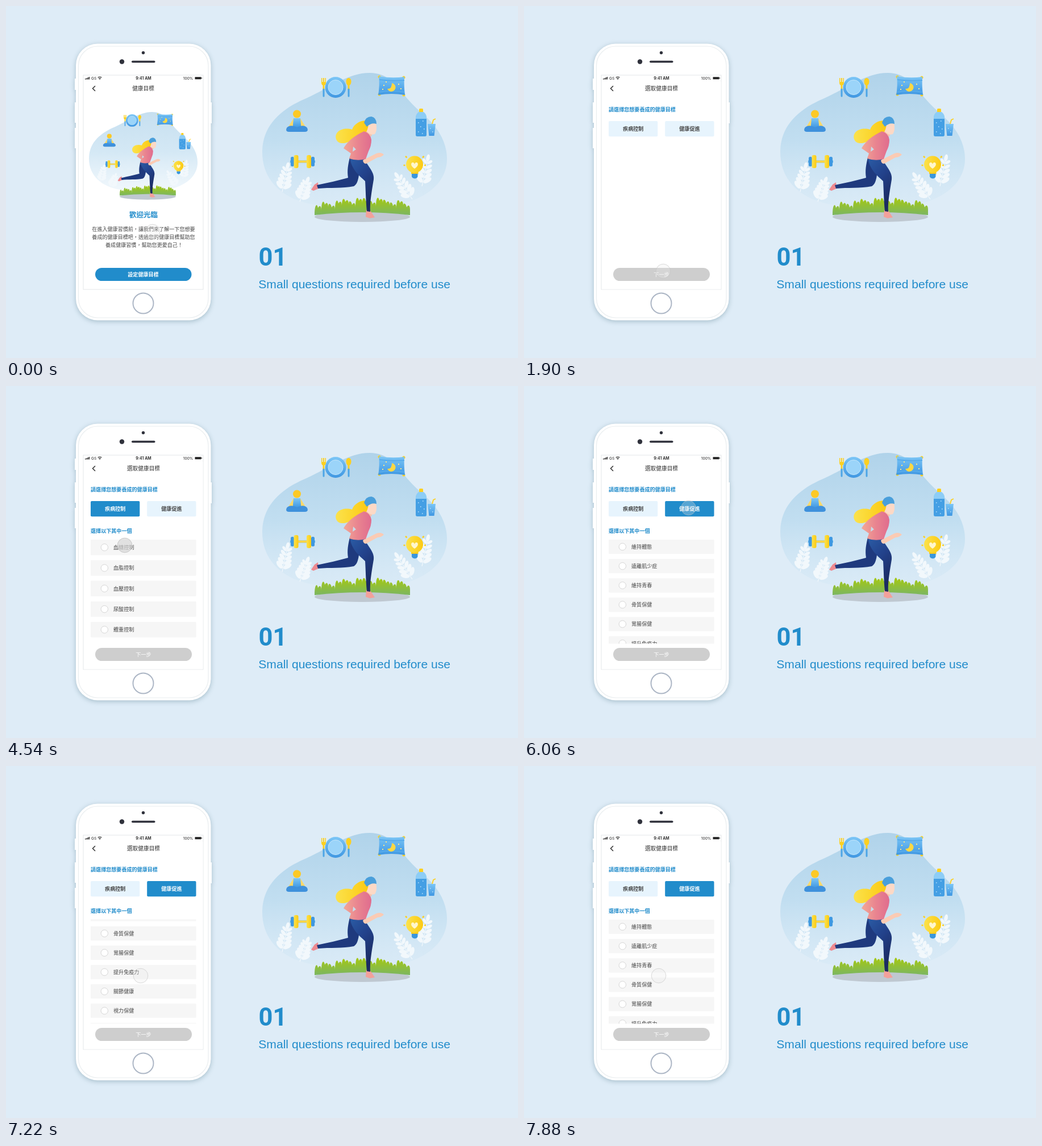
An HTML page that plays this animation: 901x621 px, repeating every 8000 ms.

```html
<!DOCTYPE html>
<html lang="zh-TW">
<head>
<meta charset="utf-8">
<title>Health goals</title>
<style>
html, body { margin: 0; width: 100%; height: 100%; overflow: hidden; background: #deecf7; }
svg { display: block; width: 901px; height: 621px; }
text { font: 400 9.07px "Noto Sans CJK TC", "Noto Sans CJK SC", "Noto Sans CJK JP", "Noto Sans CJK", sans-serif; fill: #444; }
.mid { text-anchor: middle; }
.strong { font-weight: 700; }
.title { font-size: 9.7px; font-weight: 500; fill: #333; }
.blue { fill: #218ccb; }
.white { fill: #fff; }
.status { font: 400 6.6px Inter, Roboto, sans-serif; fill: #222; }
.big { font: 700 43.5px Roboto, "Liberation Sans", sans-serif; fill: #218ccb; }
.caption { font: 400 21.1px "Liberation Sans", Arial, sans-serif; fill: #218ccb; }
.sky { opacity: var(--sky, 1); }
</style>
</head>
<body>
<svg viewBox="0 0 901 621">
<defs>
  <linearGradient id="sky" x2="0" y2="1"><stop stop-color="#b0d3ea"/><stop offset=".5" stop-color="#bfddf0" stop-opacity=".93"/><stop offset="1" stop-color="#d6e9f6" stop-opacity=".5"/></linearGradient>
  <linearGradient id="water" x2="0" y2="1"><stop stop-color="#7cc6f6"/><stop offset="1" stop-color="#3f97e2"/></linearGradient>
  <linearGradient id="gold"><stop stop-color="#fbe24c"/><stop offset="1" stop-color="#fcca12"/></linearGradient>
  <linearGradient id="pink"><stop stop-color="#f3a895"/><stop offset=".5" stop-color="#e98590"/><stop offset="1" stop-color="#e06c8e"/></linearGradient>
  <linearGradient id="navy" x2=".5" y2="1"><stop stop-color="#2b5ca6"/><stop offset=".5" stop-color="#22418a"/><stop offset="1" stop-color="#1b2a60"/></linearGradient>
  <linearGradient id="lawn" x2="0" y2="1"><stop stop-color="#a5c80f"/><stop offset="1" stop-color="#7bb663"/></linearGradient>
  <clipPath id="listClip"><path d="M148 270.5h188v184h-188z"/></clipPath>

  <g id="art">
    <path class="sky" fill="url(#sky)" d="M451 258C451 208 488 180 528 163C572 143 602 118 640 118C672 118 684 138 700 156C712 171 724 182 736 193C760 214 776 240 776 270C776 308 745 336 700 348C650 360 590 358 545 351C490 343 451 310 451 258Z"/>
    <g id="leaves" fill="#f2f8fc" stroke="#f2f8fc"></g>

    <g id="plate">
      <circle cx="580" cy="143.500" r="18.500" fill="url(#water)"/>
      <circle cx="580" cy="143.500" r="13" fill="#9bd4f9" stroke="#c4e6fc"/>
      <path d="M555 127v8q0 4 2.500 5v8h3v-8q2.500-1 2.500-5v-8h-1.500v7h-1.500v-7h-2v7h-1.500v-7zM598.500 133c0-8 9-8 9 0q0 5-3 7v8h-3v-8q-3-2-3-7z" fill="#fcd021"/>
      <path d="M559 147v12M603 147v12" stroke="#4ca5e6" stroke-width="3" stroke-linecap="round"/>
    </g>

    <g id="pillow">
      <g fill="#fcd021"><circle cx="657" cy="125" r="2.500"/><circle cx="700" cy="126" r="2.500"/><circle cx="657" cy="156" r="2.500"/><circle cx="700" cy="157" r="2.500"/></g>
      <path d="M656 124Q678 128 701 125Q700 140 702 157Q678 153 655 157Q658 140 656 124Z" fill="url(#water)"/>
      <path d="M657 130Q678 133 701 131M656 152Q678 148 701 152" stroke="#56abeb" stroke-width="2" fill="none"/>
      <path d="M679 136a7.500 7.500 0 1 1-8 10q8 1 8-10z" fill="#fcd843"/>
      <path d="M664 140h2M668 134h2M690 138h2M694 146h2M662 147h2" stroke="#fbe58b" stroke-width="2"/>
    </g>

    <g id="yoga">
      <circle cx="512" cy="190.500" r="7" fill="#fcc926"/>
      <path d="M506 198L497 213L505 216L512 205L519 216L527 213L518 198Z" fill="#fbd96a"/>
      <path d="M506 198h12l1.500 17h-15z" fill="url(#water)"/>
      <path d="M494 215Q500 208 512 214Q524 208 530 215Q533 222 526 222H498Q491 222 494 215Z" fill="#3f91dc"/>
    </g>

    <g id="dumbbell">
      <path d="M500 274.500h44" stroke="#58afe9" stroke-width="4"/>
      <path d="M512 274.500h20" stroke="#f9d548" stroke-width="4"/>
      <rect x="501" y="266" width="6" height="17" rx="2.500" fill="#4099e0"/><rect x="537" y="266" width="6" height="17" rx="2.500" fill="#4099e0"/>
      <rect x="506.500" y="263" width="8" height="23" rx="3" fill="url(#gold)"/><rect x="529" y="263" width="8" height="23" rx="3" fill="url(#gold)"/>
    </g>

    <g id="bottle">
      <rect x="727" y="181" width="7" height="7" rx="1.500" fill="#fcd021"/>
      <path d="M726 187h9q5 4 5 9v31q0 3-3 3h-13q-3 0-3-3v-31q0-5 5-9z" fill="#8dcdf6"/>
      <path d="M721 199h19v28q0 3-3 3h-13q-3 0-3-3z" fill="#449fe4"/>
      <path d="M750 208l2-7l4-2" fill="none" stroke="#fcd021" stroke-width="1.800"/>
      <path d="M742 208h14l-2.500 21h-9z" fill="url(#water)"/>
      <path d="M725 206h1.500M733 203h1.500M729 213h1.500M735 217h1.500M725 222h1.500M732 225h1.500M746 216h1.500M750 222h1.500" stroke="#bfe3fb" stroke-width="1.500"/>
    </g>

    <g id="bulb">
      <path d="M713 290h12.500v6h-12.500z" fill="#fcc91a"/>
      <circle cx="719" cy="279.500" r="15" fill="url(#gold)"/>
      <path d="M714 296h10.500v5q-1 3-5 3.500q-4.500-.5-5.500-3.500z" fill="#3b97dc"/>
      <path d="M719 287c-9-6-6-12-2.500-11q2 .5 2.500 3q.5-2.500 2.500-3c3.500-1 6.500 5-2.500 11z" fill="#fff6cc"/>
      <path d="M699.500 281h3M736 281h3M703 265l2.500 2.500M733 267.500l2.500-2.500" stroke="#fcd021" stroke-width="2.500"/>
    </g>

    <ellipse cx="627" cy="372" rx="84" ry="9" fill="#bfc8d1"/>
    <path id="grass" fill="url(#lawn)"/>

    <g id="runner">
      <path d="M549 311L550 322L541 326L537 324L543 315Z" fill="#ee8a90"/>
      <path d="M605 267L626 268C620 292 623 312 612 318C592 322 570 320 549 322L547 316C565 312 585 308 602 303C600 290 602 280 605 267Z" fill="#1f3a7e"/>
      <path d="M634 360L641 361L649 373L640 374.500L633 372Z" fill="#f3a09a"/>
      <path d="M605 267L629 268C638 284 649 294 647 306C643 330 640 348 641 363L635 362C633 340 633 325 632 309C623 300 608 290 605 267Z" fill="url(#navy)"/>
      <path d="M632 212L634 228L643 230L645 223Z" fill="#f7c3ac"/>
      <path d="M634 206Q643 200 651 206Q654 219 649 226Q641 229 635 221Z" fill="#fcd9c6"/>
      <path d="M637 203C628 200 613 206 609 218C592 213 577 222 581 235C585 246 603 243 611 234C624 236 630 226 634 222Q639 214 637 203Z" fill="url(#gold)"/>
      <path d="M630 206Q633 195 643 195Q652 197 652 208Q643 205 635 213Z" fill="#4a9fdb"/>
      <path d="M628 272L652 260Q660 257 665 262Q661 267 654 267L634 278Q629 279 628 272Z" fill="#fbcbb4"/>
      <path d="M630 221Q641 224 643 236Q643 247 638 256L633 270Q618 274 604 269L607 260L594 251Q604 233 630 221Z" fill="url(#pink)"/>
      <path d="M611 248l5 5l-6 4z" fill="#c6dcea"/>
    </g>
  </g>
</defs>

<g id="phone">
  <g style="filter:drop-shadow(0 2px 4px rgba(80,120,135,.4))" fill="#fff">
    <path d="M121 128h4v20h-4zM121 170h4v36h-4zM121 215h4v36h-4zM358 170h4v37h-4z"/>
    <rect x="123" y="66.500" width="237.500" height="488" rx="38"/>
  </g>
  <rect x="127.500" y="71" width="228.500" height="479" rx="34" fill="none" stroke="#e9edef" stroke-width="1.200"/>
  <g fill="#30323c"><circle cx="241.500" cy="82.500" r="2.700"/><circle cx="204" cy="98.300" r="4.200"/><rect x="221" y="96.500" width="41.500" height="3.600" rx="1.800"/></g>
  <circle cx="241.500" cy="524.500" r="18" fill="none" stroke="#acb6c5" stroke-width="2"/>
  <rect x="136" y="122" width="211" height="378" fill="#fff" stroke="#e4e7e9"/>
</g>

<g id="home">
  <text class="title mid" x="241.500" y="149">健康目標</text>
  <use href="#art" transform="matrix(.588 0 0 .588 -119.200 117.600)" style="--sky:.72"/>
  <text class="blue mid strong" x="242" y="372.700" style="font-size:12.500px">歡迎光臨</text>
  <text class="mid" x="242" y="397.300">在進入健康習慣前，讓我們來了解一下您想要</text>
  <text class="mid" x="242" y="410.900">養成的健康目標吧，透過您的健康目標幫助您</text>
  <text class="mid" x="243" y="424.500">養成健康習慣，幫助您更愛自己！</text>
  <rect x="157" y="462" width="169.500" height="23" rx="11.500" fill="#218ccb"/>
  <text class="white mid strong" x="241.500" y="477">設定健康目標</text>
</g>

<g id="picker">
  <path d="M137 134h209.500v365.500h-209.500z" fill="#fff"/>
  <text class="title mid" x="242" y="149">選取健康目標</text>
  <text class="blue strong" x="149" y="186">請選擇您想要養成的健康目標</text>
  <g id="tabs"></g>
  <g id="choices">
    <text class="blue strong" x="149" y="258.500">選擇以下其中一個</text>
    <g id="control"></g>
    <g clip-path="url(#listClip)"><g id="wellness"></g></g>
  </g>
  <rect id="next" x="157" y="462" width="170" height="23" rx="11.500"/>
  <text class="white mid" x="242" y="477" style="font-size:9.200px">下一步</text>
</g>

<path d="M157 141l-4.500 4.500l4.500 4.500" fill="none" stroke="#333" stroke-width="1.500"/>
<g id="statusBar">
  <path d="M139 128h1.500v1.500h-1.500zM141.200 127.200h1.500v2.300h-1.500zM143.400 126.200h1.500v3.300h-1.500zM145.600 125h1.500v4.500h-1.500zM332.500 125.200h11v4h-11zM344 126.400h1v1.600h-1z" fill="#222"/>
  <path d="M161.700 126.300q3.300-2.700 6.600 0M163.200 128q1.800-1.400 3.600 0" fill="none" stroke="#222" stroke-width="1.100"/>
  <circle cx="165" cy="129.200" r=".8" fill="#222"/>
  <text class="status" x="150" y="129.600">GS</text>
  <text class="status mid" x="242" y="129.600" style="font-weight:600;font-size:7px">9:41 AM</text>
  <text class="status" x="311.800" y="129.600">100%</text>
</g>
<circle id="touch" r="12.800"/>

<use href="#art"/>
<text class="big" x="444.500" y="458">01</text>
<text class="caption" x="444.300" y="498">Small questions required before use</text>
</svg>

<script>
const $ = id => document.getElementById(id);
const clamp = v => Math.min(1, Math.max(0, v));
const progress = (t, from, to) => clamp((t - from) / (to - from));
const easeOut = p => 1 - (1 - p) ** 3;
const easeInOut = p => p < .5 ? 2 * p * p : 1 - 2 * (1 - p) ** 2;
const within = (t, from, to) => t >= from && t < to;

// Plants: a stem with upswept leaf pairs that shrink towards the tip.
function plant(x, y, angle, length) {
  let out = `<path d="M0 0V${-length}" stroke-width="1.2"/>`;
  for (let i = 0; i < 5; i++) {
    const size = 1 - i * .09, h = -length * (.12 + i * .18);
    for (const side of [-1, 1])
      out += `<ellipse cx="${side * 9.5 * size}" cy="${h}" rx="${8 * size}" ry="${4 * size}"
        stroke="none" transform="rotate(${-side * 42} 0 ${h})"/>`;
  }
  out += `<ellipse cy="${-length - 3}" rx="3.2" ry="6.5" stroke="none"/>`;
  return `<g transform="translate(${x} ${y}) rotate(${angle})">${out}</g>`;
}
$('leaves').innerHTML = plant(486, 328, 12, 44) + plant(517, 345, 20, 37) +
  plant(715, 341, -33, 47) + plant(732, 318, 12, 48);

// Grass: rounded tufts on a gently arched baseline.
let tufts = 'M543 369';
for (let x = 543, i = 0; x < 711; x += 12, i++) {
  const arch = Math.sin((x - 531) / 192 * Math.PI);
  const tip = 353 - 13 * arch - 4 * Math.sin(i * 2.2);
  tufts += `C${x} ${tip - 3} ${x + 5} ${tip - 2} ${x + 6} ${tip + 6}C${x + 8} ${tip + 1} ${x + 12} ${tip + 1} ${x + 12} ${tip + 10}`;
}
$('grass').setAttribute('d', tufts + 'L711 369Q627 359 543 369Z');

const tab = (x, label, id) => `
  <rect x="${x}" y="203" width="86.300" height="27.300" rx="2" fill="#e7f4fd"/>
  <text class="mid strong" x="${x + 43.2}" y="220">${label}</text>
  <g id="${id}"><rect x="${x}" y="203" width="86.300" height="27.300" rx="2" fill="#218ccb"/>
  <text class="mid white strong" x="${x + 43.2}" y="220">${label}</text></g>`;
$('tabs').innerHTML = tab(149, '疾病控制', 'controlOn') + tab(248.2, '健康促進', 'wellnessOn');

const rows = (labels, first, pitch, height) => labels.split(' ').map((label, i) => {
  const y = first + i * pitch;
  return `<rect x="149" y="${y - height / 2}" width="185.500" height="${height}" rx="1" fill="#f6f6f6"/>
    <circle cx="173.300" cy="${y}" r="6.200" fill="#fff" stroke="#d6d6d6"/>
    <text x="189" y="${y + 3.4}">${label}</text>`;
}).join('');
$('control').innerHTML = rows('血糖控制 血脂控制 血壓控制 尿酸控制 體重控制', 284.7, 36.3, 27.4) +
  `<g id="picked"><rect x="149" y="271" width="185.500" height="27.400" rx="1" fill="#e7f4fd"/>
   <circle cx="173.300" cy="284.700" r="6.200" fill="#fff" stroke="#218ccb"/>
   <circle cx="173.300" cy="284.700" r="3.600" fill="#218ccb"/>
   <text x="189" y="288.100">血糖控制</text></g>`;
$('wellness').innerHTML = rows('維持體態 遠離肌少症 維持青春 骨質保健 胃腸保健 提升免疫力 關節健康 視力保健 口腔保健', 283.6, 34.1, 25.2);

// Touch path: start, end, x, y
const moves = [[0, 820, 245, 468], [2080, 2900, 207, 217], [4000, 4380, 209, 281],
  [5060, 5680, 289.5, 215], [6340, 6700, 237, 370]];
function touchAt(t) {
  let x = 258, y = 398;
  for (const [from, to, toX, toY] of moves) {
    const p = easeInOut(progress(t, from, to));
    x += (toX - x) * p;
    y += (toY - y) * p;
  }
  return [x, y];
}

function render(t) {
  const show = (id, opacity) => $(id).setAttribute('opacity', +opacity);
  const wellness = t >= 6060, picked = t >= 4680 && !wellness;
  const opened = progress(t, 2900, 3320);

  show('picker', easeOut(progress(t, 820, 1100)));
  show('choices', opened);
  show('controlOn', wellness ? 0 : opened);
  show('wellnessOn', wellness);
  show('control', !wellness);
  show('wellness', wellness);
  show('picked', picked);
  $('next').setAttribute('fill', picked ? '#218ccb' : '#cecece');

  const scroll = 91 * (easeInOut(progress(t, 6860, 7240)) - easeInOut(progress(t, 7480, 7880)));
  $('wellness').setAttribute('transform', `translate(0 ${-scroll})`);

  const [x, y] = touchAt(t), touch = $('touch');
  const pressed = within(t, 820, 960) || within(t, 2900, 3040) || within(t, 4540, 4680) || within(t, 5940, 6060);
  touch.setAttribute('cx', x);
  touch.setAttribute('cy', y);
  touch.setAttribute('fill', pressed ? 'rgba(215,215,215,.68)' : 'rgba(232,232,232,.27)');
  touch.setAttribute('stroke', pressed ? 'rgba(190,190,190,.8)' : 'rgba(195,195,195,.6)');
}

function tick() {
  render(performance.now() % 8000);
  requestAnimationFrame(tick);
}
tick();
</script>
</body>
</html>
```
